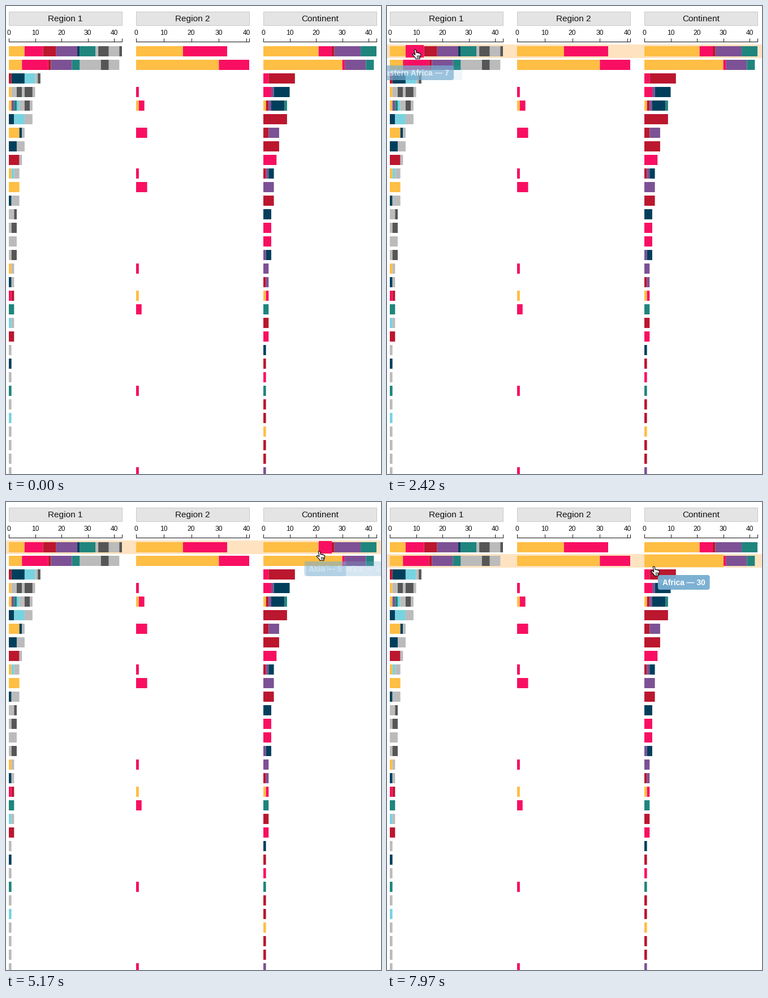
A matplotlib script that plays this animation: 663x827 px, repeating every 8000 ms.

```python
from itertools import groupby

import matplotlib.pyplot as plt
from matplotlib.animation import FuncAnimation
from matplotlib.collections import PolyCollection
from matplotlib.patches import FancyBboxPatch, Polygon, Rectangle

W, H, DPI = 663, 827, 64
PT = 72 / DPI                       # points per pixel
STEP, LOOP = 40, 8000
TOP, ROW, BAR = 68, 24, 18
DELAY, FADE_IN, FADE_OUT = 90, 180, 250

COLORS = dict(y="#ffbe44", p="#f80f62", r="#bb172f", v="#7d5195", n="#003f5c",
              t="#1f857d", c="#77d3e0", g="#bbbbbb", d="#565656")

# Each word is one row: colour letter followed by its count.
PANELS = [
    dict(title="Region 1", x=5, total=43, rows="""
        y6p7r5v8n1t6g1d4g4d1 y5p10r1v8t3g8d3g4 r1n5c4g1d1 y1g2d2g1d3g1
        y1v1t1c1g2d2g1 n2c4g3 y4n1g1 n3g3 r4g1 y1c1g2 y4 n1g3 g2d1 g1d2 g3
        g1d2 y1g1 n1g1 p1r1 t2 c1g1 r2 g1 n1 g1 t1 g1 c1 g1 g1 g1 g1""",
         names=dict(y="Middle Africa", p="Eastern Africa", r="Caribbean",
                    v="Western Africa", t="South America")),
    dict(title="Region 2", x=230, total=41, rows="""
        y17p16 y30p11 - p1 y1p2 - p4 - - p1 p4 - - - - - p1 - y1 p2
        - - - - - p1 - - - - - p1""",
         names=dict(y="Sub-Saharan Africa", p="Latin America and the Caribbean")),
    dict(title="Continent", x=455, total=43, rows="""
        y21p5r1v10t6 y30p1v8t3 p2r10 p3v1n6 y1r1v1n5t1 r9 r2v4 r6 p5 r1v1n2
        v4 r4 n3 p3 p3 v1n2 v2 r1v1 y1p1 t2 r2 p2 n1 r1 p1 t1 r1 r1 y1 r1 r1 v1""",
         names=dict(y="Africa", p="Asia", r="Europe", v="North America",
                    t="South America")),
]

# Cursor tip: time, x, y
PATH = [
    (150, 374, 0), (500, 326, 142), (680, 326, 142), (850, 250, 205),
    (1000, 140, 190), (1340, 97, 78), (1840, 97, 78), (1980, 78, 78),
    (2100, 78, 78), (2310, 50, 77), (2710, 50, 77), (2930, 285, 83),
    (3600, 285, 83), (3760, 330, 84), (4370, 330, 84), (4720, 605, 84),
    (4915, 605, 84), (5105, 554, 87), (5215, 554, 87), (5320, 510, 84),
    (5690, 510, 84), (5850, 600, 83), (5900, 600, 83), (6060, 646, 81),
    (6670, 646, 81), (6780, 675, 86), (7150, 675, 86), (7480, 495, 112),
    (7910, 495, 112), (7970, 472, 114),
]
AWAKE = 680                         # bars react to the cursor from here on

HAND = [(-1.8, 1), (-1, 0), (0.4, 0), (1.3, 1), (2.4, 6), (3, 5.2), (4.4, 5.2),
        (5.1, 6.3), (5.7, 5.7), (7, 6), (7.5, 7.1), (8.1, 6.7), (9.3, 7.2),
        (9.6, 8.6), (9.3, 11.5), (8.1, 14), (7.9, 16.4), (0.8, 16.4),
        (0.4, 14.8), (-1.8, 12.2), (-4.6, 9.2), (-4.5, 8), (-3.2, 7.5),
        (-1.6, 8.4), (-0.2, 9.6), (-0.8, 5)]
CREASES = [2.7, 4.8, 6.8]
ARROW = [(0, 0), (0, 14.5), (3.4, 11.4), (5.8, 16.8), (8.2, 15.8), (5.9, 10.6),
         (10.4, 10.2)]


def clamp(v):
    return max(0.0, min(1.0, v))


def cursor_at(t):
    if t <= PATH[0][0]:
        return PATH[0][1:]
    for (t0, x0, y0), (t1, x1, y1) in zip(PATH, PATH[1:]):
        if t < t1:
            k = (t - t0) / (t1 - t0)
            k = k * k * (3 - 2 * k)
            return x0 + (x1 - x0) * k, y0 + (y1 - y0) * k
    return PATH[-1][1:]


def parse(word):
    parts = ["".join(g) for _, g in groupby(word, str.isdigit)]
    return [(key, int(n)) for key, n in zip(parts[::2], parts[1::2])]


def build_segments():
    out = []
    for panel in PANELS:
        unit = 200 / panel["total"]
        for row, word in enumerate(panel["rows"].split()):
            start = 0
            for key, count in parse(word):
                end = start + count
                name = panel["names"].get(key)
                out.append(dict(x0=panel["x"] + start * unit,
                                x1=panel["x"] + end * unit,
                                row=row, color=COLORS[key],
                                label=name and f"{name} — {count}"))
                start = end
    return out


def hit(x, y):
    row = (y - TOP) // ROW
    for seg in segments:
        if seg["row"] == row and seg["x0"] <= x < seg["x1"]:
            return seg
    return None


def hover_spans():
    spans = []
    for t in range(AWAKE, LOOP, 5):
        seg = hit(*cursor_at(t))
        if spans and spans[-1][0] is seg:
            spans[-1][2] = t + 5
        else:
            spans.append([seg, t, t + 5])
    return spans


def label(x, y, text, size, **kw):
    return ax.text(x, y, text, size=size * PT, ha="center", va="baseline",
                   family="Liberation Sans", **kw)


def box(seg):
    y = TOP + 3 + ROW * seg["row"]
    return [(seg["x0"], y), (seg["x1"], y),
            (seg["x1"], y + BAR), (seg["x0"], y + BAR)]


segments = build_segments()
spans = hover_spans()

fig = plt.figure(figsize=(W / DPI, H / DPI), dpi=DPI, facecolor="white")
ax = fig.add_axes([0, 0, 1, 1])
ax.set_xlim(0, W)
ax.set_ylim(H, 0)
ax.axis("off")

for panel in PANELS:
    x = panel["x"]
    ax.add_patch(Rectangle((x, 9.5), 200, 24.5, fc="#e4e4e4", ec="#c9c9c9", lw=PT))
    label(x + 99.7, 27, panel["title"], 15.4, color="#111111")
    ax.plot([x, x, x + 200, x + 200], [57, 63, 63, 57], color="#111111", lw=PT,
            solid_joinstyle="miter", solid_capstyle="butt")
    for n in range(0, panel["total"], 10):
        tx = x + n * 200 / panel["total"]
        ax.plot([tx, tx], [57, 63], color="#111111", lw=PT, solid_capstyle="butt")
        label(tx, 51, str(n), 12, color="#111111")

band = ax.add_patch(Rectangle((0, TOP), W, ROW, fc="#ffe3c0", lw=0, zorder=1.1))
bars = PolyCollection([box(s) for s in segments], linewidths=0,
                      facecolors=[s["color"] for s in segments], zorder=2)
bars.set_snap(False)
ax.add_collection(bars, autolim=False)
raised = ax.add_patch(Rectangle((0, 0), 1, BAR + 4, lw=0, zorder=3))

# One tooltip for every hover long enough to show it.
tips = []
renderer = fig.canvas.get_renderer()
for seg, t0, t1 in spans:
    if seg and seg["label"] and t1 - t0 > DELAY:
        cx, top = (seg["x0"] + seg["x1"]) / 2, TOP + 37 + ROW * seg["row"]
        z = 5 + len(tips) * 0.01
        text = label(cx, top + 18, seg["label"], 13.7, color="white",
                     weight="bold", zorder=z + 0.005)
        w = text.get_window_extent(renderer).width + 16
        frame = ax.add_patch(FancyBboxPatch(
            (cx - w / 2, top), w, 26, boxstyle="round,pad=0,rounding_size=4",
            fc="#78aed2", lw=0, zorder=z))
        tips.append((frame, text, t0, t1))

ax.set_xlim(0, W)
ax.set_ylim(H, 0)

outline = dict(closed=True, lw=1.1 * PT, joinstyle="round", zorder=8)
hand = ax.add_patch(Polygon(HAND, fc="white", ec="black", **outline))
arrow = ax.add_patch(Polygon(ARROW, fc="black", ec="white", **outline))
creases = [ax.plot([0, 0], [0, 0], color="black", lw=0.9 * PT, zorder=9)[0]
           for _ in CREASES]


def tip_alpha(t, t0, t1):
    shown = clamp((min(t, t1) - t0 - DELAY) / FADE_IN)
    return clamp(shown - max(0, t - t1) / FADE_OUT)


def update(i):
    t = i * STEP + STEP / 2
    x, y = cursor_at(t)

    seg, row = None, None
    for s, t0, t1 in spans:
        if t0 <= t:
            seg = s
            row = s["row"] if s else row

    band.set_visible(row is not None)
    if row is not None:
        band.set_y(TOP + ROW * row)

    raised.set_visible(seg is not None)
    if seg:
        raised.set_xy((seg["x0"], TOP + 1 + ROW * seg["row"]))
        raised.set_width(seg["x1"] - seg["x0"])
        raised.set_facecolor(seg["color"])

    for frame, text, t0, t1 in tips:
        a = tip_alpha(t, t0, t1)
        for part, full in ((frame, 0.96), (text, 1)):
            part.set_visible(a > 0)
            part.set_alpha(a * full)

    present = t >= PATH[0][0]
    hand.set_visible(present and seg is not None)
    arrow.set_visible(present and seg is None)
    hand.set_xy([(x + px, y + py) for px, py in HAND])
    arrow.set_xy([(x + px, y + py) for px, py in ARROW])
    for line, px in zip(creases, CREASES):
        line.set_visible(hand.get_visible())
        line.set_data([x + px, x + px], [y + 10.2, y + 13.8])
    return []


anim = FuncAnimation(fig, update, frames=LOOP // STEP, interval=STEP,
                     init_func=lambda: update(0), repeat=True, repeat_delay=0)
plt.show()
```
